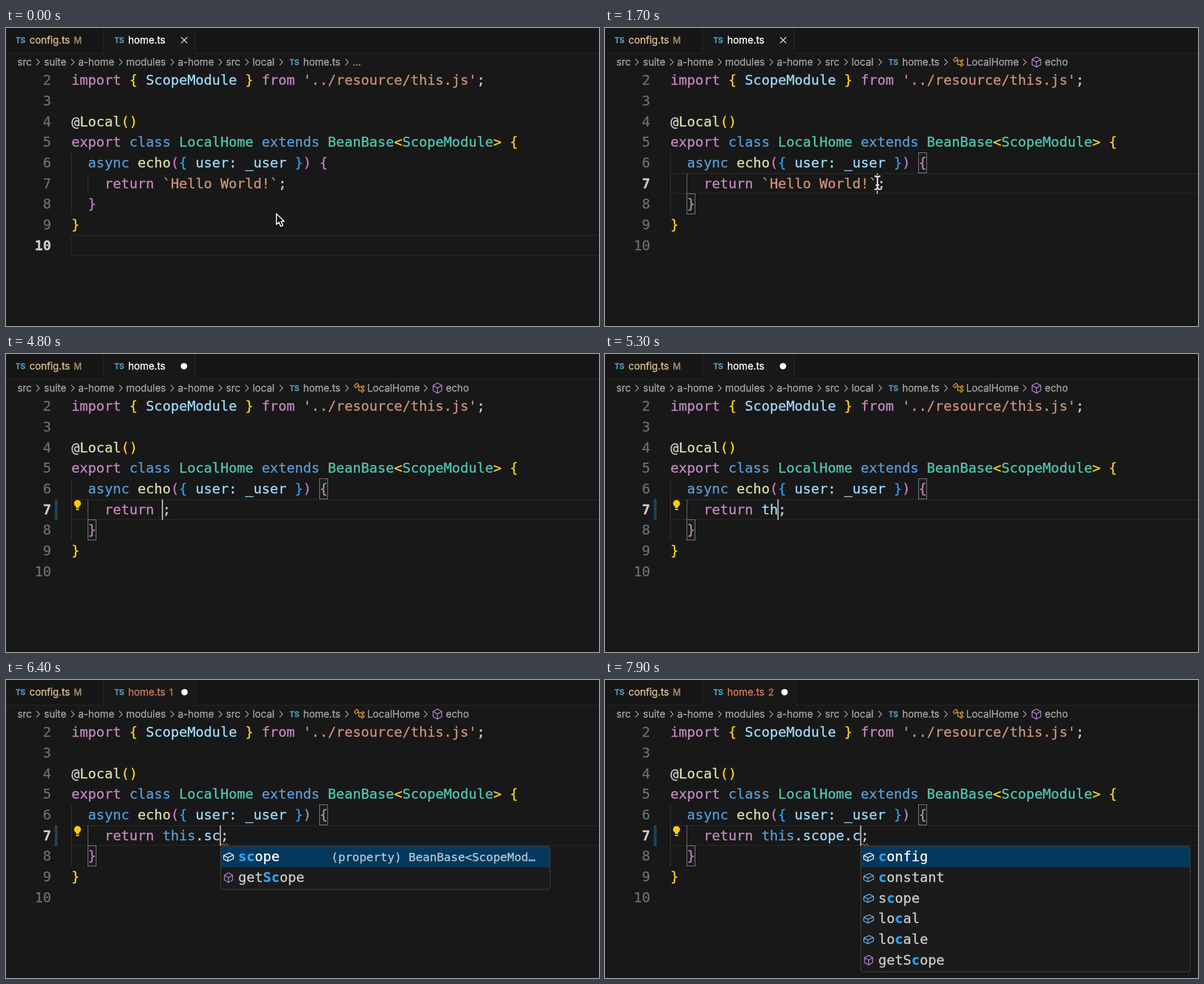
Recreate the animation shown at these times as an HTML page with a canvas. Size 1024 by 515 pixels, loop 8000 ms.

```html
<!DOCTYPE html>
<html lang="en">
<head>
<meta charset="utf-8">
<title>Code editor</title>
<style>
  html, body { margin: 0; width: 100%; height: 100%; overflow: hidden; background: #181818; }
  canvas { display: block; }
</style>
</head>
<body>
<canvas id="stage" width="1024" height="515"></canvas>
<script>
const ctx = document.getElementById('stage').getContext('2d');
const LOOP = 8000, STEP = 100;
const LEFT = 113, CHAR = 14.285, ROW = 35.65, CODE = 23.73;
const MONO = '"DejaVu Sans Mono", monospace', UI = 'Inter, sans-serif';

const COLOR = {
  key: '#c586c0', blue: '#569cd6', type: '#4ec9b0', name: '#9cdcfe', fn: '#dcdcaa',
  str: '#ce9178', gold: '#ffd21a', pink: '#c97bcb', azure: '#2f9df4', text: '#cccccc',
  bad: '#80502f', crumb: '#a4a4a4', ts: '#4f94b5', wave: '#b5563a'
};

const colX = col => LEFT + col * CHAR;
const rowTop = line => 251.3 + (line - 7) * ROW;
const baseline = line => rowTop(line) + 25.3;

// Latest value whose time has come.
const at = (list, t) => list.reduce((v, [time, next]) => t >= time ? next : v, null);

// Timeline
const CLICK = 600, ERASE = 2500, ERASE_GAP = 140, QUOTED = '`Hello World!`';
const ERASE_END = ERASE + ERASE_GAP * (QUOTED.length - 1);
const TYPED = [[5200, 't'], [5300, 'th'], [5500, 'thi'], [5600, 'this'], [5750, 'this.'],
  [6100, 'this.s'], [6300, 'this.sc'], [6700, 'this.scope'], [7100, 'this.scope.'], [7900, 'this.scope.c']];
const ERRORS = [[0, 0], [3000, 1], [4700, 0], [6000, 1], [7000, 0], [7500, 2]];
const POPUPS = [
  [5900, { items: 'app bean ctx echo scope getScope' }],
  [6100, { items: 'scope getScope', match: 's' }],
  [6300, { items: 'scope getScope', match: 'sc', detail: '(property) BeanBase<ScopeMod…' }],
  [6700, null],
  [7300, { items: 'config constant error event local locale' }],
  [7900, { items: 'config constant scope local locale getScope', match: 'c' }]
];

function stateAt(t) {
  const erased = t < ERASE ? 0 : Math.min(QUOTED.length, Math.floor((t - ERASE) / ERASE_GAP) + 1);
  const typed = at(TYPED, t);
  const body = typed || QUOTED.slice(0, QUOTED.length - erased);
  let moved = CLICK;
  if (erased) moved = ERASE + (erased - 1) * ERASE_GAP;
  TYPED.forEach(([time]) => { if (t >= time) moved = time; });
  return {
    t, body, typed: !!typed, col: 11 + body.length,
    focus: t >= CLICK, dirty: erased > 0,
    broken: erased > 0 && t < ERASE_END,
    caret: t >= CLICK && (t - moved) % 1000 < 500,
    errors: at(ERRORS, t), popup: at(POPUPS, t)
  };
}

// Drawing helpers
// A hairline outline gives the glyphs a slightly fuller weight.
function glyphs(text, x, y, font, color) {
  ctx.font = font;
  ctx.fillStyle = ctx.strokeStyle = color;
  ctx.lineWidth = 0.35;
  ctx.fillText(text, x, y);
  ctx.strokeText(text, x, y);
}

function label(text, x, y, color, size = 17, weight = 400) {
  glyphs(text, x, y, `${weight} ${size}px ${UI}`, color);
}

function mono(text, x, y, color, size = CODE, weight = 400) {
  const step = size * CHAR / CODE;
  [...text].forEach((ch, i) => glyphs(ch, x + i * step, y, `${weight} ${size}px ${MONO}`, color));
}

function tokens(line, col, parts) {
  for (const [text, color] of parts) {
    mono(text, colX(col), baseline(line), COLOR[color]);
    col += text.length;
  }
}

function rect(x, y, w, h, color) {
  ctx.fillStyle = color;
  ctx.fillRect(x, y, w, h);
}

function disc(x, y, r, color) {
  ctx.fillStyle = color;
  ctx.beginPath();
  ctx.arc(x, y, r, 0, 7);
  ctx.fill();
}

function stroke(d, color, width) {
  ctx.strokeStyle = color;
  ctx.lineWidth = width;
  ctx.stroke(new Path2D(d));
}

// Icons live on a 16-unit grid centred on (x, y).
const ICONS = {
  cube: 'M8 1.4L13.5 4.6V11.2L8 14.4L2.5 11.2V4.6ZM2.7 4.8L8 7.8L13.3 4.8M8 7.8V14.2',
  brick: 'M9 2.5L14.5 5.2V10.2L7 13.6L1.5 10.9V5.9ZM1.7 6L7 8.6L14.3 5.3M7 8.6V13.4',
  family: 'M1.5 5.2L5.2 1.5L7.7 4L4 7.7ZM11 7L13.5 4.5L15 6L12.5 8.5ZM11 12L13.5 9.5L15 11L12.5 13.5ZM6 6H11.5M7.8 6V11.2H11.5',
  chevron: 'M6 3.6L10.2 8L6 12.4',
  close: 'M3.8 3.8L12.2 12.2M12.2 3.8L3.8 12.2'
};

function icon(name, x, y, color, scale = 1.25, width = 1.1) {
  ctx.save();
  ctx.translate(x, y);
  ctx.scale(scale, scale);
  ctx.translate(-8, -8);
  ctx.lineJoin = 'round';
  stroke(ICONS[name], color, width);
  ctx.restore();
}

function wave(x, y) {
  stroke(`M${x} ${y + 2}l3.5 -3l3.5 3l3.5 -3l3.5 3`, COLOR.wave, 1.4);
}

function drawTabs(s) {
  const shift = [0, 1, 3][s.errors], edge = 326 + shift;
  rect(0, 0, 1024, 43, '#161616');
  rect(169, 0, edge - 169, 44, '#181818');
  rect(168, 0, 1, 43, '#272727');
  rect(edge, 0, 1, 43, '#272727');
  rect(0, 43, 169, 1, '#272727');
  rect(edge, 43, 1024 - edge, 1, '#272727');

  label('TS', 16.5, 25.5, COLOR.ts, 13, 700);
  label('config.ts', 40.5, 27, '#dcbd8c');
  label('M', 117, 27, '#a58a66', 15.3, 500);

  label('TS', 187, 25.5, COLOR.ts, 13, 700);
  label('home.ts', 211, 27, s.errors ? '#d67c5c' : '#ffffff');
  if (s.errors) label(s.errors, 281.8, 27, '#bd6f52', 15.8, 500);
  if (s.dirty) disc(307.3 + shift * 0.9, 21, 5.6, '#ffffff');
  else icon('close', 307.7, 21, '#e0e0e0', 1.25, 1.25);
}

function drawCrumbs(s) {
  const crumbs = [['src', 19.7, 55], ['suite', 65.7, 115], ['a-home', 124.7, 198], ['modules', 207.5, 287],
    ['a-home', 296.7, 370], ['src', 380, 416], ['local', 425.7, 475], ['home.ts', 513.2, 588.5]];
  if (s.t >= 800) crumbs.push(['LocalHome', 623.7, 724.5], ['echo', 759.5]);
  else crumbs.push(['...', 598.5]);
  for (const [text, x, chevron] of crumbs) {
    label(text, x, 65, COLOR.crumb);
    if (chevron) icon('chevron', chevron, 59, COLOR.crumb);
  }
  label('TS', 489.5, 63.5, COLOR.ts, 13, 700);
  if (s.t >= 800) {
    icon('family', 609.5, 59, '#e29a35', 1.3);
    icon('cube', 745, 59, '#ab7fcd', 1.36);
  }
}

function drawCode(s) {
  const active = s.focus ? 7 : 10;
  ctx.strokeStyle = '#272727';
  ctx.lineWidth = 1.5;
  ctx.strokeRect(113, rowTop(active) + 0.4, 1000, 34);

  rect(112.5, rowTop(6), 1, ROW * 3, '#363636');
  rect(141, rowTop(7), 1, ROW, s.focus ? '#707070' : '#363636');

  for (let n = 2; n <= 10; n++) {
    const on = n === active;
    mono(String(n), 78 - CHAR * String(n).length, baseline(n), on ? '#cccccc' : '#6b6e72', CODE, on ? 700 : 400);
  }

  if (s.focus && !s.broken) {
    for (const [col, line] of [[30, 6], [2, 8]]) {
      const x = Math.floor(colX(col)), y = Math.floor(rowTop(line));
      rect(x, y, 15, 36, 'rgba(0, 100, 0, .1)');
      ctx.strokeStyle = '#888888';
      ctx.lineWidth = 1;
      ctx.strokeRect(x + 0.5, y + 0.5, 14, 35);
    }
  }

  tokens(2, 0, [['import', 'key'], [' { ', 'gold'], ['ScopeModule', 'name'], [' } ', 'gold'],
    ['from ', 'key'], ["'../resource/this.js'", 'str'], [';', 'text']]);
  tokens(4, 0, [['@', 'text'], ['Local', 'fn'], ['()', 'gold']]);
  tokens(5, 0, [['export', 'key'], [' class ', 'blue'], ['LocalHome', 'type'], [' extends ', 'blue'],
    ['BeanBase', 'type'], ['<', 'gold'], ['ScopeModule', 'type'], ['> ', 'gold'], ['{', s.broken ? 'bad' : 'gold']]);
  tokens(6, 2, [['async ', 'blue'], ['echo', 'fn'], ['(', 'pink'], ['{ ', 'azure'], ['user: _user', 'name'],
    [' }', 'azure'], [') ', 'pink'], ['{', s.broken ? 'bad' : 'pink']]);

  tokens(7, 4, [['return', 'key']]);
  if (s.typed) {
    const words = s.body.split('.');
    const parts = [[words[0], words[0] === 'this' ? 'blue' : 'name']];
    words.slice(1).forEach(w => parts.push(['.', 'text'], [w, 'name']));
    tokens(7, 11, parts);
  } else {
    tokens(7, 11, [[s.body, 'str']]);
  }
  tokens(7, s.col, [[';', s.broken ? 'str' : 'text']]);
  tokens(8, 2, [['}', s.broken ? 'str' : 'pink']]);
  tokens(9, 0, [['}', s.broken ? 'str' : 'gold']]);

  if (s.errors) {
    if (s.typed) wave(colX(s.col), 284);
    else wave(112.5, 390.5);
  }
}

function drawMarks(s) {
  if (s.t >= 2900) {
    disc(123.5, 258.3, 6, '#ffcc00');
    rect(120.8, 261, 5.4, 5, '#ffcc00');
    rect(121.2, 267.3, 4.6, 2.6, '#ffcc00');
  }
  if (s.t >= 4700) {
    ctx.save();
    ctx.beginPath();
    ctx.rect(84, 251, 5, 36);
    ctx.clip();
    for (let y = 248; y < 296; y += 4) stroke(`M83 ${y + 3.5}L90 ${y - 3.5}`, '#2a83bd', 1.2);
    ctx.restore();
  }
  if (s.caret) rect(colX(s.col) - 1, 251.3, 2, 35.4, '#c4c4c4');
}

function drawPopup(s) {
  if (!s.popup) return;
  const { items, match = '', detail } = s.popup;
  const list = items.split(' ');
  const x = Math.floor(colX(s.col)) + 0.5, y = 287.5, h = list.length * ROW + 3;
  ctx.beginPath();
  ctx.roundRect(x, y, 569, h, 3);
  ctx.fillStyle = '#1b1b1b';
  ctx.fill();
  ctx.strokeStyle = '#454545';
  ctx.lineWidth = 1;
  ctx.stroke();
  rect(x + 0.5, 288, 568, 35.6, '#04395e');

  list.forEach((item, i) => {
    const top = 288 + i * ROW, method = item === 'getScope' || item === 'echo';
    const tint = i === 0 ? '#ffffff' : method ? '#b180d7' : '#6cb4ee';
    icon(method ? 'cube' : 'brick', x + 13.7, top + 18, tint, 1.28);
    const from = match ? item.toLowerCase().indexOf(match) : -1;
    [...item].forEach((ch, k) => {
      const hit = from >= 0 && k >= from && k < from + match.length;
      mono(ch, x + 30.5 + k * CHAR, top + 25.4, hit ? '#2aa5f7' : i ? '#cccccc' : '#ffffff', CODE, hit ? 700 : 400);
    });
  });
  if (detail) mono(detail, x + 191, 312.5, '#b6c6d2', 20.2);
}

function drawPointer(t) {
  if (t >= ERASE) return;
  const k = Math.min(1, t / 500), ease = k * k * (3 - 2 * k);
  ctx.save();
  ctx.translate(467 + 3.5 * ease, 321 - 53.5 * ease);
  ctx.lineJoin = 'round';
  if (t < 200) {
    const arrow = 'M0 0V18.5L4.4 14.6L7.3 21.8L11 20.2L8 13.2H13.4Z';
    ctx.fillStyle = '#101010';
    ctx.fill(new Path2D(arrow));
    stroke(arrow, '#ffffff', 1.7);
  } else {
    const beam = 'M-5 -11.5Q0 -11.5 0 -8V8Q0 11.5 -5 11.5M5 -11.5Q0 -11.5 0 -8M0 8Q0 11.5 5 11.5M-3 4H3';
    stroke(beam, '#151515', 5);
    stroke(beam, '#f2f2f2', 2.3);
  }
  ctx.restore();
}

function draw(t) {
  const s = stateAt(t);
  rect(0, 0, 1024, 515, '#181818');
  drawTabs(s);
  drawCrumbs(s);
  drawCode(s);
  drawMarks(s);
  drawPopup(s);
  drawPointer(t);
}

const start = performance.now();
function frame(now) {
  const t = Math.max(0, now - start) % LOOP;
  draw(Math.floor(t / STEP) * STEP);
  requestAnimationFrame(frame);
}
draw(0);
requestAnimationFrame(frame);
</script>
</body>
</html>
```
